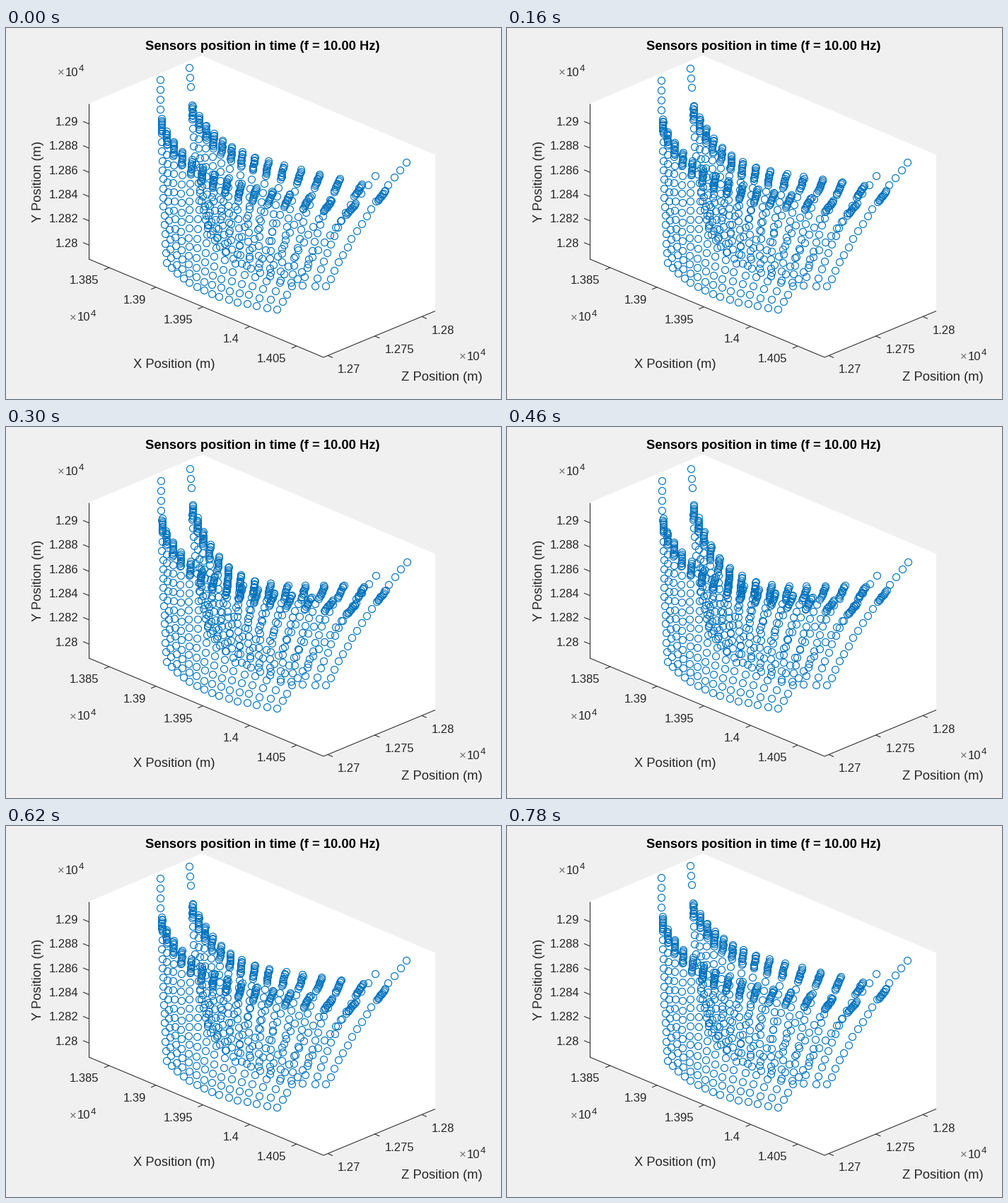
A matplotlib script that plays this animation: 700x525 px, repeating every 0.8 s.

```python
import numpy as np
import matplotlib.pyplot as plt
from matplotlib.animation import FuncAnimation

W, H, DPI = 700, 525, 100
FRAMES, STEP = 40, 20
PT = 72 / DPI
COLS = 15
SPACING = 13.2
BLUE, INK = "#0072BD", "#262626"

plt.rcParams["font.family"] = "Liberation Sans"
fig = plt.figure(figsize=(W / DPI, H / DPI), dpi=DPI, facecolor="#F0F0F0")
ax = fig.add_axes([0, 0, 1, 1])
ax.set_xlim(0, W)
ax.set_ylim(H, 0)
ax.axis("off")
rng = np.random.default_rng(4)


def label(x, y, text, size=16.67, color=INK, **kw):
    ax.text(x, y, text, fontsize=size * PT, color=color, va="baseline", **kw)


def line(x0, y0, x1, y1):
    ax.plot([x0, x1], [y0, y1], color=INK, lw=0.75, solid_capstyle="butt")


def power(x, y):
    label(x, y, "×", color="#707070")
    label(x + 10.3, y, "10")
    label(x + 29.3, y - 6.5, "4", 13.3)


def ticks(start, step, mark, offset, texts, ha):
    for i, text in enumerate(texts):
        x, y = np.add(start, np.multiply(step, i))
        line(x, y, x + mark[0], y + mark[1])
        label(x + offset[0], y + offset[1], text, ha=ha)


def draw_axes():
    left, corner, right = (117, 327), (449, 466), (607, 400.5)
    box = [(117, 107), (277, 39), (607, 179.5), right, corner, left]
    ax.add_patch(plt.Polygon(box, fc="white", ec="none"))
    line(117, 107, *left)
    line(*left, *corner)
    line(*corner, *right)

    ticks((117, 307), (0, -34.3), (-8, -3.3), (-15, 2.5),
          ["1.28", "1.282", "1.284", "1.286", "1.288", "1.29"], "right")
    ticks((146, 339), (66.2, 27.8), (-7, 3), (-14.5, 23),
          ["1.385", "1.39", "1.395", "1.4", "1.405"], "right")
    ticks((455, 463.5), (66.4, -27.6), (7, 3), (14, 24.5),
          ["1.27", "1.275", "1.28"], "left")

    power(73, 67.5)
    power(90, 414.5)
    power(641, 469.5)
    label(363, 31, "Sensors position in time (f = 10.00 Hz)", 18.33, "black",
          weight="bold", ha="center")
    label(237.5, 481, "X Position (m)", 18.33, ha="center")
    label(616, 499, "Z Position (m)", 18.33, ha="center")
    label(50, 217.5, "Y Position (m)", 18.33, ha="center", rotation=90,
          rotation_mode="anchor")


def curve(columns, *points):
    """Smooth curve through key points, sampled at every column."""
    fit = np.polyfit(columns, np.array(points, float), len(points) - 1)
    return np.column_stack([np.polyval(c, np.arange(COLS)) for c in fit.T])


def hang(top, foot, bow):
    """One hanging column: a dense knot at the rim, then even steps down."""
    ctrl = (top + foot) / 2 + [bow, 0]
    u = np.linspace(0, 1, 200)[:, None]
    path = (1 - u) ** 2 * top + 2 * u * (1 - u) * ctrl + u ** 2 * foot
    dist = np.r_[0, np.cumsum(np.hypot(*np.diff(path, axis=0).T))]
    aim = (ctrl - top) / np.hypot(*(ctrl - top))
    knot = top + np.linspace(-10, 10, 10)[:, None] * aim
    count = round((dist[-1] - 9) / SPACING)
    at = np.linspace(9 + SPACING, dist[-1], count)
    down = np.column_stack([np.interp(at, dist, c) for c in path.T])
    pts = np.vstack([knot, down])
    pts += rng.uniform(-0.7, 0.7, pts.shape)
    pull = np.r_[np.ones(len(knot)), (1 - at / dist[-1]) ** 1.6]
    return pts, pull[:, None]


def side(rim, feet, bow, swing, base):
    """All columns of one side, at rest and with their full displacement."""
    u = np.linspace(0, 1, COLS)
    sway = np.column_stack([-swing[0] * np.sin(2 * np.pi * u),
                            swing[1] * np.sin(np.pi * u) ** 1.6]) + base
    rest, move = [], []
    for top, foot, b, shift in zip(rim, feet, np.linspace(*bow, COLS), sway):
        pts, pull = hang(top, foot, b)
        rest.append(pts)
        move.append(pull * shift)
    return np.vstack(rest), np.vstack(move)


def tower(start, end, count, shift):
    return np.linspace(start, end, count), np.tile(shift, (count, 1))


RIM_KEYS, FOOT_KEYS = (0, 4, 7, 10, 14), (0, 5, 9, 14)
front_rim = curve(RIM_KEYS, (220, 139), (262, 197), (311, 224), (373, 240),
                  (488, 256))
front_feet = curve(FOOT_KEYS, (227, 331), (269, 366), (314, 384), (384, 398))
back_rim = curve(RIM_KEYS, (263, 119), (305, 169), (350, 192), (414, 210),
                 (530, 238))
back_feet = curve(FOOT_KEYS, (285, 283), (321, 325), (373, 352), (453, 366))

parts = [
    tower((218, 73), (218, 115), 4, (1.3, 3.2)),
    tower((259, 56), (261, 83), 3, (1.3, 3.5)),
    tower((522, 209), (502, 234), 3, (1.2, 0.6)),
    tower((566, 190), (540, 222), 4, (1.2, 0.6)),
    side(back_rim, back_feet, (-10, -10), (6.5, 36), (0.5, 1.5)),
    side(front_rim, front_feet, (-2, -9), (2.5, 4), (0.5, 1)),
]
rest, move = (np.vstack(p) for p in zip(*parts))

draw_axes()
dots, = ax.plot([], [], "o", ms=10 * PT, mfc="none", mec=BLUE, mew=0.85)


def update(i):
    # the last frame closes the cycle on the first pose
    swing = (1 - np.cos(2 * np.pi * i / (FRAMES - 1))) / 2
    dots.set_data(*(rest + 1.06 * swing * move).T)
    return (dots,)


anim = FuncAnimation(fig, update, frames=FRAMES, interval=STEP, repeat=True,
                     repeat_delay=0, blit=False)
plt.show()
```
